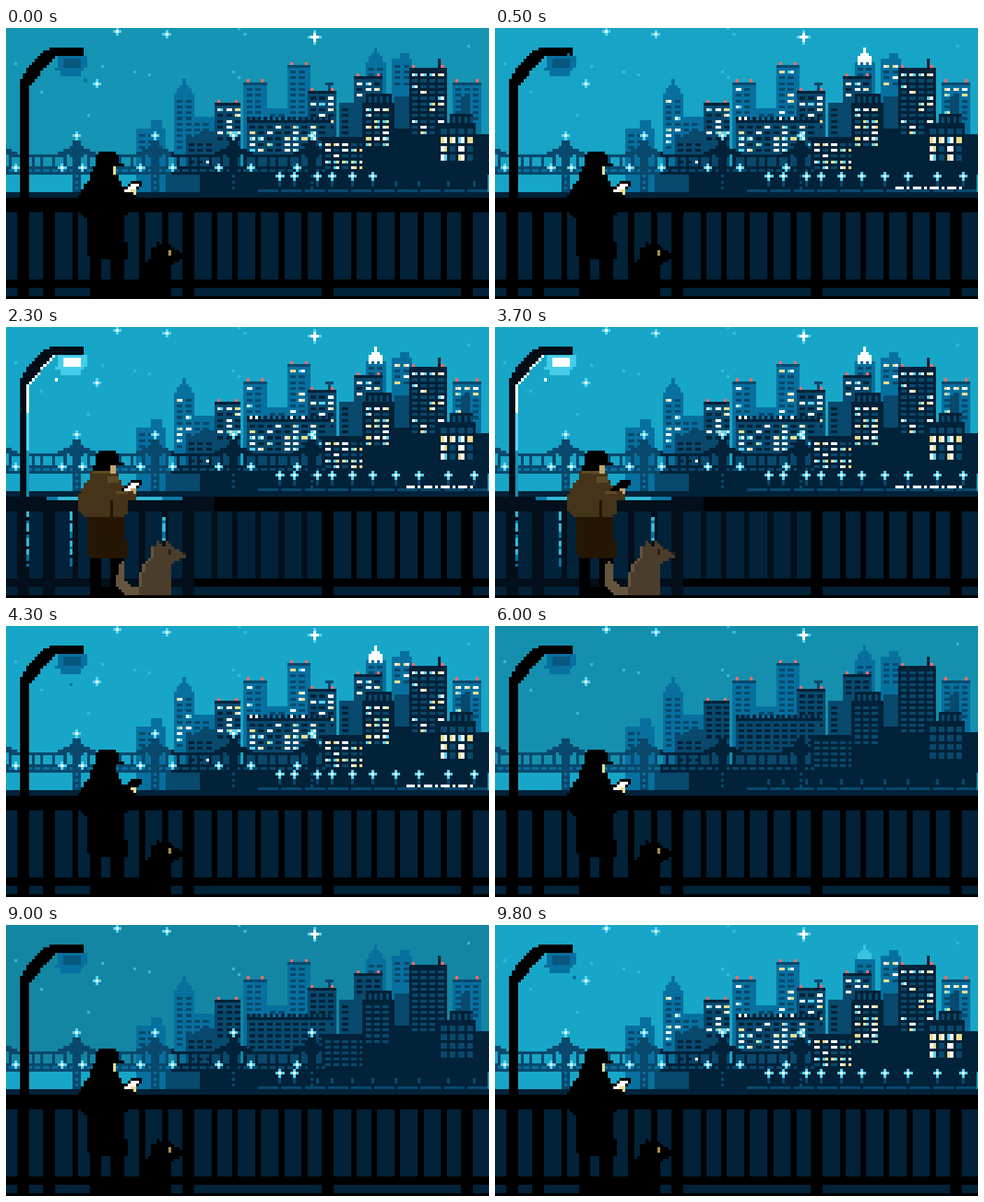
Animation of 690x388 px, one loop 9.9 s. Source, as an HTML page with a canvas:

```html
<!DOCTYPE html>
<html lang="en">
<head>
<meta charset="utf-8">
<title>Harbour at night</title>
<style>
html, body { margin: 0; width: 100%; height: 100%; overflow: hidden; background: #000; }
canvas { display: block; width: 690px; height: 388px; }
</style>
</head>
<body>
<canvas id="stage" width="690" height="388"></canvas>
<script>
const LOOP = 9900, STEP = 100, U = 4.146;
const FAR = '#07709f', MID = '#08496d', NAVY = '#022239', BLACK = '#000';
const WHITE = '#fff', CYAN = '#58d4f2', YELLOW = '#eede91', SHEEN = '#030f1a', SKIN = '#c9a56a';
const g = document.getElementById('stage').getContext('2d');
let now = 0;

// All drawing is in cells of the pixel grid.
const px = k => Math.round(k * U - .5), py = k => Math.round(k * U + 3);
function rect(c, x, y, w = 1, h = 1) {
  g.fillStyle = c;
  g.fillRect(px(x), py(y), px(x + w) - px(x), py(y + h) - py(y));
}

// Fills every cell whose centre lies inside the polygon.
function shape(c, pts, from = 0) {
  for (let y = from; y < 93; y++) {
    const cuts = [];
    pts.forEach(([x1, y1], i) => {
      const [x2, y2] = pts[(i + 1) % pts.length], m = y + .5;
      if ((y1 <= m) !== (y2 <= m)) cuts.push(Math.round(x1 + (x2 - x1) * (m - y1) / (y2 - y1)));
    });
    cuts.sort((a, b) => a - b);
    for (let i = 0; i + 1 < cuts.length; i += 2) rect(c, cuts[i], y, cuts[i + 1] - cuts[i]);
  }
}

const rand = (a, b) => {
  const v = Math.sin(a * 12.9898 + b * 78.233) * 43758.5453;
  return v - Math.floor(v);
};

function glint(x, y, r = 1) {
  rect(CYAN, x - r, y, 2 * r + 1);
  rect(CYAN, x, y - r, 1, 2 * r + 1);
  rect(WHITE, x - r + 1, y, 2 * r - 1);
  rect(WHITE, x, y - r + 1, 1, 2 * r - 1);
}

// The loop opens part of the way through dusk, so early times continue it.
const dusk = () => now < 5000 ? now + 9400 : now;
const lit = (on, off) => dusk() >= on && (now < off || now > 8000);

function skyColor() {
  const clamp = v => Math.max(0, Math.min(1, v));
  const k = now < 5000 ? clamp(.45 + now / 1000)
    : now < 9000 ? clamp((6300 - now) / 1000) : clamp((now - 9000) / 800);
  const mix = (a, b) => Math.round(a + (b - a) * k);
  return `rgb(${mix(19, 23)},${mix(134, 166)},${mix(163, 200)})`;
}

function stars() {
  const dots = [[3, 11], [33, 12], [44, 14], [49, 15], [28, 29], [80, -1], [82, 1], [159, 5], [78, 14], [80, 16], [12, 21]];
  dots.forEach(([x, y]) => rect('#35b9d8', x, y));
  glint(38, 0);
  glint(55, 1);
  glint(31, 18);
  glint(106, 2, 2);
}

// Window panes, two cells wide; each cell takes its own tint.
function panes(wall, x, top, w, rows, share, h) {
  const dim = wall === MID ? NAVY : MID;
  const on = wall === FAR ? 9550 : 9200;
  for (let j = 0; j < rows; j++)
    for (let i = 0; i * 3 + 2 < w; i++) {
      const y = top + j * (h + 1), cx = x + 1 + i * 3;
      const shown = rand(cx, y) < share && lit(on + 150 * rand(x, j), 4600 + 1200 * rand(j, x));
      for (let s = 0; s < 2; s++) {
        const r = rand(cx + s, y + 7);
        rect(shown ? (r < .58 ? WHITE : r < .85 ? YELLOW : CYAN) : dim, cx + s, y, 1, h);
      }
    }
}

function tower(wall, x, top, w, rows = 0, share = 0, beacons = false, h = 1) {
  rect(wall, x, top, w, 50 - top);
  panes(wall, x, top + 2, w, rows, share, h);
  if (!beacons) return;
  rect(wall === FAR ? MID : NAVY, x, top, w);
  rect('#f76c67', x + 1, top - 1);
  rect('#f76c67', x + w - 2, top - 1);
}

function spire(c, mid, top) {
  for (let i = 0; i < 3; i++) rect(c, mid - i, top + (i ? i + 1 : 0), 2 * i + 1, 2);
}

function crown(x, top, w) {
  rect(NAVY, x, top, w, 3);
  for (let i = 1; i < w; i += 2) rect(MID, x + i, top + 1, 1, 2);
}

function city() {
  tower(FAR, 45, 34, 10, 3);
  tower(FAR, 50, 31, 4);
  spire(FAR, 61, 17);
  tower(FAR, 58, 22, 7, 9, .45);
  rect(FAR, 59, 20, 5, 2);
  tower(FAR, 64, 30, 8, 3);
  tower(FAR, 82, 18, 8, 6, .45, true);
  tower(FAR, 90, 27, 7, 2);
  tower(FAR, 97, 12, 8, 9, .5, true);
  spire(FAR, 127, 6);
  tower(FAR, 124, 11, 7, 3);
  tower(FAR, 133, 10, 7, 4, .6);
  rect(FAR, 136, 8, 3, 2);
  tower(FAR, 154, 18, 10, 6, .45, true);

  tower(MID, 62, 37, 11, 5, .2);
  rect(MID, 67, 35, 5, 2);
  tower(MID, 72, 25, 9, 6, .6, true);
  tower(MID, 115, 25, 5, 5);
  tower(MID, 134, 23, 5);
  tower(MID, 157, 23, 3);
  tower(MID, 104, 21, 10, 6, .5, true);
  rect(MID, 110, 18, 3);
  rect(MID, 111, 19, 1, 2);
  tower(MID, 83, 31, 29, 5, .45);
  rect(NAVY, 83, 31, 29);
  for (let x = 83; x < 112; x += 2) rect(NAVY, x, 30);
  tower(MID, 120, 16, 10, 3, .7, true);

  tower(NAVY, 133, 34, 7);
  tower(NAVY, 109, 37, 15, 5, .55);
  tower(NAVY, 123, 25, 11, 7, .6);
  crown(124, 22, 9);
  tower(NAVY, 139, 13, 13, 11, .4, true);
  rect(NAVY, 149, 10, 1, 3);
  tower(NAVY, 161, 36, 6);
  tower(NAVY, 149, 32, 13, 4, .55, false, 2);
  crown(153, 29, 8);
  if (lit(9800, 6500)) spire(lit(9900, 6500) ? WHITE : '#3bc4e2', 127, 6);
  if (lit(9900, 6500)) for (let x = 125; x < 130; x += 2) rect(WHITE, x, 11);
}

const TOWERS = [24, 51, 78, 105];

function bridge() {
  rect(FAR, 45, 50, 10, 6);
  rect(MID, 55, 50, 12, 6);
  rect(NAVY, 67, 49, 99, 7);
  for (let x = 0; x < 110; x++) {
    const ink = x < 57 ? MID : NAVY;
    const d = Math.abs((x - 24 + 121) % 27 - 13);
    const y = 43 - Math.round(5 * Math.max(0, 1 - d / 8) ** 1.5);
    rect(ink, x, y, 1, d < 7 ? 2 : 1);
    if (d > 3 && d % 4 === 0) rect(ink, x, y, 1, 47 - y);
    rect(ink, x, 47);
    rect(x % 3 ? (x < 57 ? FAR : MID) : ink, x, 48);
    rect(ink, x, 49);
  }
  TOWERS.forEach(x => {
    const ink = x < 57 ? MID : NAVY;
    rect(ink, x - 1, 38, 3, 18);
    rect(ink, x - 2, 40, 5, 4);
    for (let y = 50; y < 55; y += 2) rect(x < 57 ? FAR : MID, x, y);
  });
  [3, 19, 26, 46, 57, 73, 84, 100].forEach((x, i) => lit(8300 + i * 60, 5100 + i * 80) && glint(x, 47));
  TOWERS.forEach((x, i) => lit(8500 + i * 80, 5000 + i * 100) && glint(x, 36));
}

function shore() {
  for (let x = 87; x < 166; x += 8) rect(MID, x, 55, 7);
  [94, 99, 107, 112, 119, 126, 134, 142, 152, 161].forEach((x, i) => {
    rect(MID, x, 52, 1, 2);
    if (lit(8900 + i * 85, 4800 + i * 90)) glint(x, 50);
  });
  if (lit(9900, 5400)) for (let x = 138; x < 161; x += 2) rect(WHITE, x, 54, x % 3 ? 1 : 2);
}

function railing(on) {
  const ink = x => on && x < 62 ? SHEEN : BLACK;
  rect(NAVY, 0, 56, 167, 2);
  rect(BLACK, 0, 58, 167, 36);
  if (on) rect(SHEEN, 0, 58, 72, 5), rect(SHEEN, 0, 86, 62, 3);
  rect(NAVY, 0, 63, 167, 23);
  rect(NAVY, 0, 89, 167, 3);
  for (let x = -35; x < 166; x += 48) {
    rect(ink(x), x, 58, 4, 34);
    for (let i = 0; i < 5; i++) rect(ink(x), x + Math.round(9.5 + 7.8 * i), 63, 2, 23);
  }
  rect(ink(4), 4, 58, 4, 34);
  rect(BLACK, 29, 89, 17, 3);
  if (!on) return;
  rect('#0b78a5', 14, 58, 47);
  rect('#35b9d8', 18, 58, 9);
  rect('#35b9d8', 44, 58, 10);
  for (let y = 63; y < 82; y++) {
    const c = rand(y, 3) < .5 ? FAR : '#35b9d8';
    if (y % 5) rect(c, 7, y);
    if (y % 6) rect(c, 22, y);
    if (y > 64 && y < 73) rect(c, 54, y);
  }
}

function lampPost(on) {
  rect(on ? '#45cde9' : FAR, 18, 9, 10, 4);
  rect(on ? '#45cde9' : FAR, 17, 13, 10);
  rect(on ? '#45cde9' : FAR, 19, 14, 7, 2);
  rect(on ? WHITE : '#07577f', 20, 10, 6, 3);
  const ink = on ? '#020d18' : BLACK;
  for (let y = 6; y < 19; y++)
    for (let x = 5; x < 17; x++) {
      const dx = 16.5 - x, dy = 18.5 - y;
      const outer = (dx / 12) ** 1.4 + (dy / 13) ** 1.4, inner = dx / 9 + dy / 10;
      if (outer < 1.03 && inner > .95) rect(on && inner < 1.06 ? WHITE : ink, x, y);
    }
  rect(ink, 17, 6, 10, 3);
  rect(ink, 5, 19, 3, 39);
  if (on) for (let y = 19; y < 58; y++) rect(y < 29 ? WHITE : y < 42 ? CYAN : '#168fb5', 7, y);
}

function moth(on) {
  if (now >= 5000 && now < 9700) return;
  const a = (140 + (now / STEP - 9) * 360 / 7) * Math.PI / 180;
  rect(on ? WHITE : FAR, Math.round(22 + 6.5 * Math.cos(a)), Math.round(13 + 6 * Math.sin(a)));
}

function man(on) {
  const coat = on ? '#45341a' : BLACK, low = on ? '#251604' : BLACK;
  const body = [[29, 49], [38, 49], [39, 51], [40, 53], [42, 57], [42, 63], [41, 65], [41, 73], [42, 74],
    [42, 78], [41, 79], [29, 79], [28, 78], [28, 66], [25, 62], [25, 58], [27, 54], [29, 51]];
  rect(BLACK, 29, 78, 4, 14);
  rect(BLACK, 36, 78, 5, 14);
  rect(BLACK, 32, 42, 6);
  rect(BLACK, 31, 43, 8, 3);
  rect(BLACK, 31, 46, 10);
  rect(BLACK, 30, 47, 8, 3);
  shape(coat, body);
  shape(low, body, 65);
  rect(coat, 40, 56, 5, 3);
  if (on) {
    rect('#5f4a25', 30, 49, 7);
    rect('#5f4a25', 35, 51, 4, 2);
    rect('#5f4a25', 38, 56, 4);
    rect(low, 36, 59, 1, 6);
  }
  const glow = now < 3700 || now >= 5000;
  if (on) rect(SKIN, 36, 47, 2, 3);
  else if (glow) rect(YELLOW, 37, 47, 1, 3);
  rect(BLACK, 43, 52, 4);
  for (let i = 0; i < 3; i++) {
    rect(BLACK, 42 - i, 53 + i, 5);
    if (glow) rect(WHITE, 43 - i, 53 + i, 3);
  }
  rect(on ? SKIN : YELLOW, 43, 55, 2);
  rect(on ? SKIN : YELLOW, 44, 56);
}

function dog(on) {
  const fur = on ? '#4b3d2c' : BLACK, pale = on ? '#65553f' : BLACK;
  const sway = now % 400 < 200 ? 0 : 1;
  shape(pale, [[38 + sway, 81], [40 + sway, 80], [41, 83], [41, 87], [43, 89], [46, 90], [46, 92], [41, 92], [38, 88]]);
  const body = [[52, 73], [53, 73], [54, 75], [55, 75], [55, 73], [56, 73], [57, 75], [58, 76], [62, 77], [62, 79],
    [58, 80], [57, 82], [57, 92], [45, 92], [46, 85], [48, 80], [50, 78], [50, 75], [52, 75]];
  shape(pale, body);
  shape(fur, body.map(([x, y]) => [x < 52 ? x + 1 : x, y]));
  rect(on ? '#2a1d14' : '#a98f42', 56, 76, 1, 2);
  if (on) rect('#2a1d14', 61, 77);
}

function draw() {
  const on = (now >= 600 && now < 800) || (now >= 1100 && now < 4200);
  g.fillStyle = skyColor();
  g.fillRect(0, 0, 690, 240);
  stars();
  rect('#17a6c8', 0, 50, 45, 6);
  city();
  bridge();
  shore();
  railing(on);
  lampPost(on);
  moth(on);
  man(on);
  dog(on);
}

let last = -1;
function tick() {
  now = Math.floor(performance.now() % LOOP / STEP) * STEP;
  if (now !== last) draw();
  last = now;
  requestAnimationFrame(tick);
}
tick();
</script>
</body>
</html>
```
